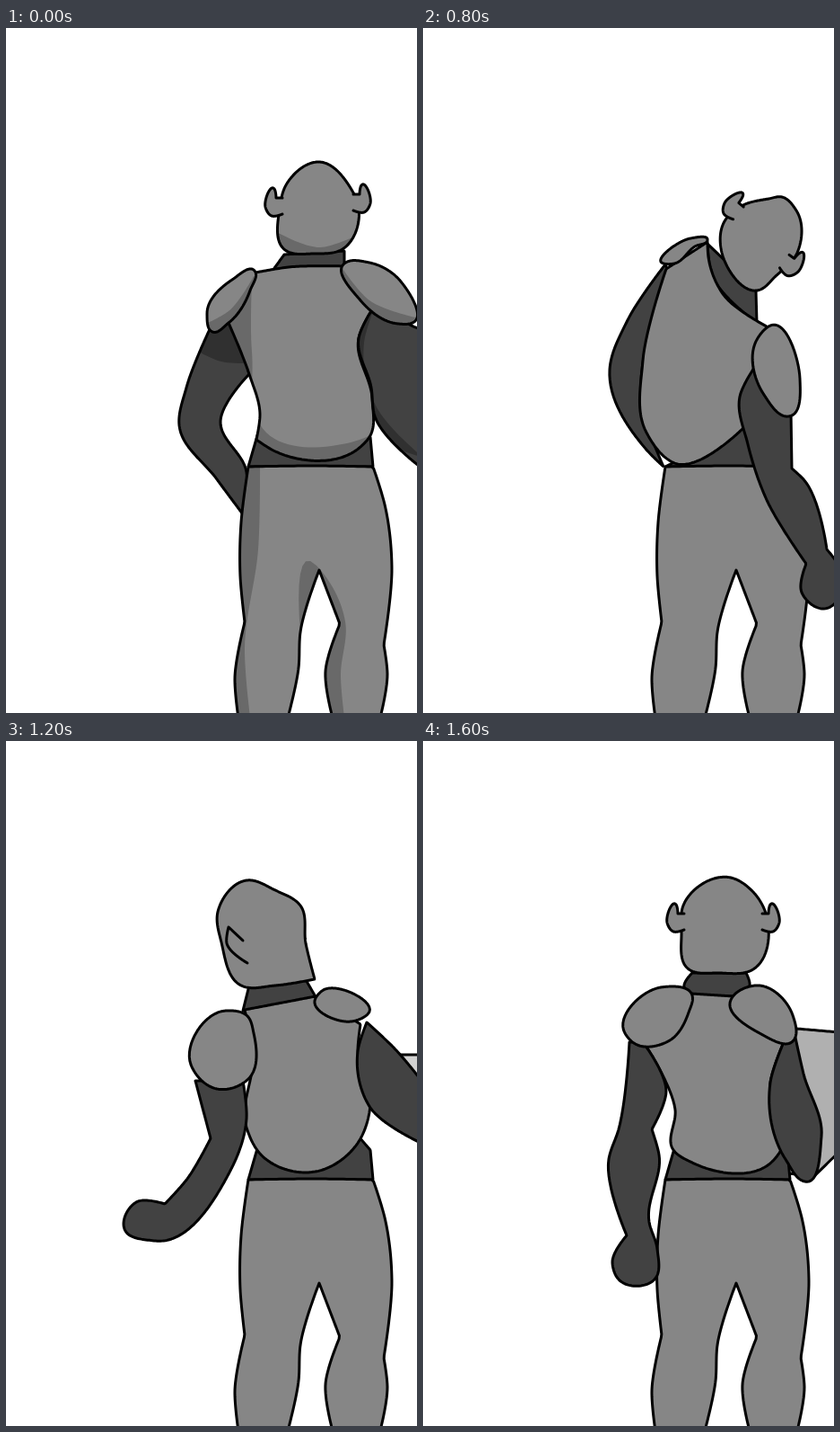
Recreate the animation shown at these times as an HTML page with a canvas. Size 458 px wide and 762 px high, loop 1700 ms.

```html
<!DOCTYPE html>
<html lang="en">
<head>
<meta charset="utf-8">
<title>Turning knight</title>
<style>
html, body { margin: 0; width: 100%; height: 100%; overflow: hidden; background: #fff; }
canvas { display: block; }
</style>
</head>
<body>
<canvas id="stage" width="458" height="762"></canvas>
<script>
const ctx = document.getElementById('stage').getContext('2d');
const SAMPLES = 300;
const STEEL = '#868686', CLOTH = '#424242', STEEL_SHADE = '#696969', CLOTH_SHADE = '#303030';
const COLORS = { neck: CLOTH, waist: CLOTH, armL: CLOTH, armR: CLOTH, sword: '#b0b0b0' };
const isOpen = part => part.startsWith('horn');

// "x,y" is a smooth point, "x,y!" a corner.
const parse = text => text.trim().split(/\s+/).map(word => {
  const [x, y] = word.replace('!', '').split(',').map(Number);
  return { x, y, corner: word.endsWith('!') };
});

// A helmet horn, side -1 left or 1 right, turned with the head.
function horn(side, x, y, degrees) {
  const c = Math.cos(degrees * Math.PI / 180), s = Math.sin(degrees * Math.PI / 180);
  return parse('-1,-10 6,-10! 8,-20 18,0 11,10 -1,8').map(p => ({
    x: x + side * p.x * c - p.y * s, y: y + side * p.x * s + p.y * c, corner: p.corner
  }));
}

const legs = parse(`270,488! 262,550 261,610 266,661! 255,722 260,775! 312,775! 326,712 328,672 349,603!
  372,663! 356,715 366,775! 415,775! 425,718 421,686! 430,600 422,530 409,488! 345,487`);
const waist = parse('281,450! 270,488! 409,488! 406,455! 393,440!');

// Parts stand in painting order; their outlines start at matching points.
const rest = {
  neck: parse('310,252! 377,248! 377,270! 297,270!'),
  armL: parse('228,333! 201,400 193,442 235,502 264,541! 268,494 239,437 271,385! 255,320!'),
  waist, legs,
  torso: parse(`315,266 278,272! 248,328! 271,385 283,430 279,458! 300,471 395,466 405,455 408,412
    393,345 410,310! 377,265!`),
  armR: parse('410,310! 393,345 407,400 411,432 460,487! 475,340! 454,332!'),
  head: parse('349,149 313,173 305,200 311,247 343,251 375,246 393,200 384,178'),
  hornL: horn(-1, 307, 199, 0),
  hornR: horn(1, 388, 195, 0),
  padL: parse('277,270 252,280 224,318 230,338 248,328 272,292'),
  padR: parse('377,262 405,261 440,282 453,328 437,329 395,303')
};

const lean = {
  neck: parse('303,263! 318,263! 345,282 378,288 381,312! 340,300'),
  armL: parse('232,303! 198,370 190,420 230,482 266,516! 270,485! 235,422 266,362! 245,305!'),
  waist: parse('286,447! 270,488! 409,488! 398,464!'),
  torso: parse(`298,263! 252,313! 267,362 285,446! 320,466 380,473 398,466! 398,440 389,380 394,347!
    381,309! 340,290`),
  armR: parse('394,347! 389,375 399,466 425,503 475,590 470,625 510,620 490,575 447,450! 440,378!'),
  legs,
  head: parse('378,183 337,200 320,220 318,262 348,286 375,283 406,246 403,210'),
  hornL: horn(-1, 331, 207, 27),
  hornR: horn(1, 400, 252, 27),
  padL: parse('297,254 270,258 233,290 239,312 265,303 290,276'),
  padR: parse('385,292 422,300 444,340 440,378 400,355 382,315')
};

const reach = {
  neck: parse('317,240! 371,292! 372,328! 322,275'),
  armL: parse('270,263! 228,325 208,380 248,468 268,488! 244,420 272,268!'),
  waist: parse('290,478! 270,488! 374,488! 358,442!'),
  legs,
  torso: parse('317,238! 271,268! 245,370 249,450 280,484 357,445! 355,415 371,375! 383,332! 335,297 318,255'),
  armR: parse(`371,375! 353,410 362,463 383,525 427,596! 422,628 447,646 470,620 450,580! 424,502
    411,490! 410,425!`),
  head: parse('385,190 355,198 336,215 333,250 376,291 392,277 417,250 416,203 400,188'),
  hornL: horn(-1, 350, 206, 40),
  hornR: horn(1, 403, 261, 36),
  padL: parse('317,236 298,234 268,262 280,262 303,243'),
  padR: parse('373,345 385,332 420,390 408,432 380,408')
};

const recoil = {
  neck: parse('314,280! 336,278 390,298! 391,320!'),
  armL: parse('268,313! 228,380 242,430 272,474! 280,440 261,389 283,355 273,315!'),
  waist: parse('279,457! 270,488! 374,488! 366,448!'),
  legs,
  torso: parse('314,281! 272,314! 285,380 279,457 318,481 360,462 366,440 366,360! 400,329! 345,303'),
  armR: parse(`371,393! 366,445 374,490 405,530 452,587! 448,612 475,622 490,595 460,522 419,475!
    425,435 412,390!`),
  head: parse('405,197 360,212 342,240 334,275 392,303 404,300 413,275 427,250 420,210'),
  hornL: horn(-1, 349, 229, 15),
  hornR: horn(1, 421, 264, 40),
  padL: parse('314,280 298,276 266,312 282,302'),
  padR: parse('365,365 393,329 423,358 405,402 375,398')
};

const swing = {
  sword: parse('430,349! 475,410! 475,349!'),
  neck: parse('271,272! 332,262! 347,288! 264,300!'),
  waist, legs,
  torso: parse('266,299! 275,350 268,430 283,459 345,479 390,450 406,405 392,345 395,315! 345,284!'),
  armR: parse('402,313! 392,345 406,408 460,446! 480,400! 432,341'),
  armL: parse('211,378! 228,442! 202,487 177,515! 145,513 132,543 165,556 250,478 268,420 264,378!'),
  head: parse('268,155 236,190 240,224 262,272 300,272 344,265! 334,225 328,183 300,166'),
  hornL: parse('264,222 248,207! 246,225 269,247'),
  padL: parse('269,306 245,300 206,360 235,387 270,376 276,325'),
  padR: parse('345,286 352,278 403,304 385,312')
};

const strike = {
  sword: parse('106,387! 64,430! 300,420! 300,375!'),
  neck: parse('278,272! 341,255! 343,266! 276,290!'),
  waist, legs,
  armR: parse('378,340! 386,427 404,407 393,365'),
  torso: parse('287,288! 285,440 305,459 350,463 402,452 382,410 381,300! 343,264!'),
  armL: parse(`237,355! 224,400 235,463 254,481! 225,515 193,554! 165,539 153,580 190,583 282,505!
    284,470 293,440 290,362!`),
  head: parse('281,143 247,185 246,212 270,272! 350,250! 341,205 333,177 310,156'),
  hornL: parse('264,211 245,197! 250,228 270,235'),
  padL: parse('300,290 250,289 229,320 250,370 300,356 313,320'),
  padR: parse('343,264 352,260 386,290 366,276')
};

const settle = {
  sword: parse('300,310! 300,470! 436,484! 475,446! 475,325!'),
  neck: parse('300,258! 360,258! 364,272 345,284! 303,284! 291,274'),
  waist, legs,
  torso: parse('300,281! 247,337! 281,410 279,455 300,469 390,467 399,455 387,380 402,335! 345,284!'),
  armR: parse('402,335! 387,380 405,467 425,490 444,440 424,370 415,330!'),
  armL: parse(`230,335! 218,432 207,465 227,550! 211,580 218,599 258,599 261,565 252,535 263,460
    255,432! 271,390 245,335!`),
  head: parse('343,152 290,183 288,212 295,253 330,258 368,254 383,195 368,168'),
  hornL: horn(-1, 290, 202, 0),
  hornR: horn(1, 379, 202, 0),
  padL: parse('300,283 265,274 225,325 235,336 275,333 296,302'),
  padR: parse('343,288 370,272 412,305 413,333 375,325')
};

// Shadows of the resting pose, clipped to their part.
const shades = {
  legs: [STEEL_SHADE, '283,480! 281,580 266,690 273,775! 240,775! 240,480!',
    '346,598 378,660 373,720 378,775! 340,775!'],
  torso: [STEEL_SHADE, '275,262! 274,360 290,450 380,462 410,452! 412,485! 260,485! 230,330!'],
  head: [STEEL_SHADE, '300,226! 350,244 388,232! 384,260! 300,260!'],
  padL: [STEEL_SHADE, '276,276! 248,315 218,331! 230,350! 290,290!'],
  padR: [STEEL_SHADE, '374,266! 405,303 456,322! 450,345! 370,290!'],
  armL: [CLOTH_SHADE, '200,352! 240,371 290,372! 290,310!'],
  armR: [CLOTH_SHADE, '413,305! 399,350 412,420 465,478! 380,450! 380,310!']
};

const mix = (a, b, k) => ({ x: a.x + (b.x - a.x) * k, y: a.y + (b.y - a.y) * k });
const gap = (a, b) => Math.hypot(b.x - a.x, b.y - a.y);

// Unit direction of the curve at b, none at corners.
function heading(a, b, c) {
  const before = gap(a, b), after = gap(b, c);
  if (b.corner || !before || !after) return { x: 0, y: 0 };
  const dir = axis => (b[axis] - a[axis]) / before * after + (c[axis] - b[axis]) / after * before;
  const x = dir('x'), y = dir('y'), size = Math.hypot(x, y) || 1;
  return { x: x / size, y: y / size };
}

// Smooth curve through the points, as short line pieces.
function smooth(points, open) {
  const n = points.length, out = [];
  const at = i => open ? points[Math.max(0, Math.min(n - 1, i))] : points[(i + n) % n];
  for (let i = 0; i < (open ? n - 1 : n); i++) {
    const a = at(i), b = at(i + 1), len = gap(a, b);
    const u = heading(at(i - 1), a, b), v = heading(a, b, at(i + 2));
    for (let t = 0; t < 1; t += 1 / 16) {
      const p = mix(a, b, t * t * (3 - 2 * t)), g = len * t * (1 - t) ** 2, h = len * t * t * (1 - t);
      out.push({ x: p.x + g * u.x - h * v.x, y: p.y + g * u.y - h * v.y });
    }
  }
  out.push(at(open ? n - 1 : 0));
  return out;
}

// Points at equal distances, so any two outlines can be blended.
function outline(points, open) {
  const line = smooth(points, open), dist = [0];
  for (let i = 1; i < line.length; i++) dist.push(dist[i - 1] + gap(line[i - 1], line[i]));
  const total = dist[dist.length - 1];
  let i = 1;
  return Array.from({ length: SAMPLES + 1 }, (_, s) => {
    const d = total * s / SAMPLES;
    while (i < line.length - 1 && dist[i] < d) i++;
    return mix(line[i - 1], line[i], (d - dist[i - 1]) / (dist[i] - dist[i - 1] || 1));
  });
}

function blend(from, to, k) {
  const parts = {};
  for (const part in to) {
    if (!from[part]) continue;
    const goal = outline(to[part], isOpen(part));
    parts[part] = outline(from[part], isOpen(part)).map((p, i) => mix(p, goal[i], k));
  }
  return parts;
}

// A held pose, or one on the way to the next by the share k.
const step = (start, pose, next = pose, k = 0) => ({ start, pose, parts: blend(pose, next, k) });
const steps = [
  step(0, rest), step(500, lean), step(600, lean, reach, 1 / 3), step(700, lean, reach, 2 / 3),
  step(800, reach), step(1000, recoil), step(1100, recoil, swing, .5), step(1200, swing),
  step(1300, swing, strike, .5), step(1400, strike), step(1500, strike, settle, .35), step(1600, settle)
];

function trace(points) {
  ctx.beginPath();
  points.forEach(p => ctx.lineTo(p.x, p.y));
}

function draw({ pose, parts }) {
  ctx.fillStyle = '#fff';
  ctx.fillRect(0, 0, 458, 762);
  ctx.lineWidth = 3;
  ctx.lineJoin = ctx.lineCap = 'round';
  for (const [part, points] of Object.entries(parts)) {
    trace(points);
    ctx.fillStyle = part === 'sword' && pose === swing ? '#d2d2d2' : COLORS[part] || STEEL;
    ctx.fill();
    if (pose === rest && shades[part]) {
      const [color, ...areas] = shades[part];
      ctx.save();
      ctx.clip();
      ctx.fillStyle = color;
      for (const area of areas) {
        trace(smooth(parse(area)));
        ctx.fill();
      }
      ctx.restore();
      trace(points);
    }
    if (!isOpen(part)) ctx.closePath();
    ctx.stroke();
  }
}

const begin = performance.now();
function tick() {
  const time = (performance.now() - begin) % 1700;
  draw(steps.filter(s => s.start <= time).pop());
  requestAnimationFrame(tick);
}
tick();
</script>
</body>
</html>
```
